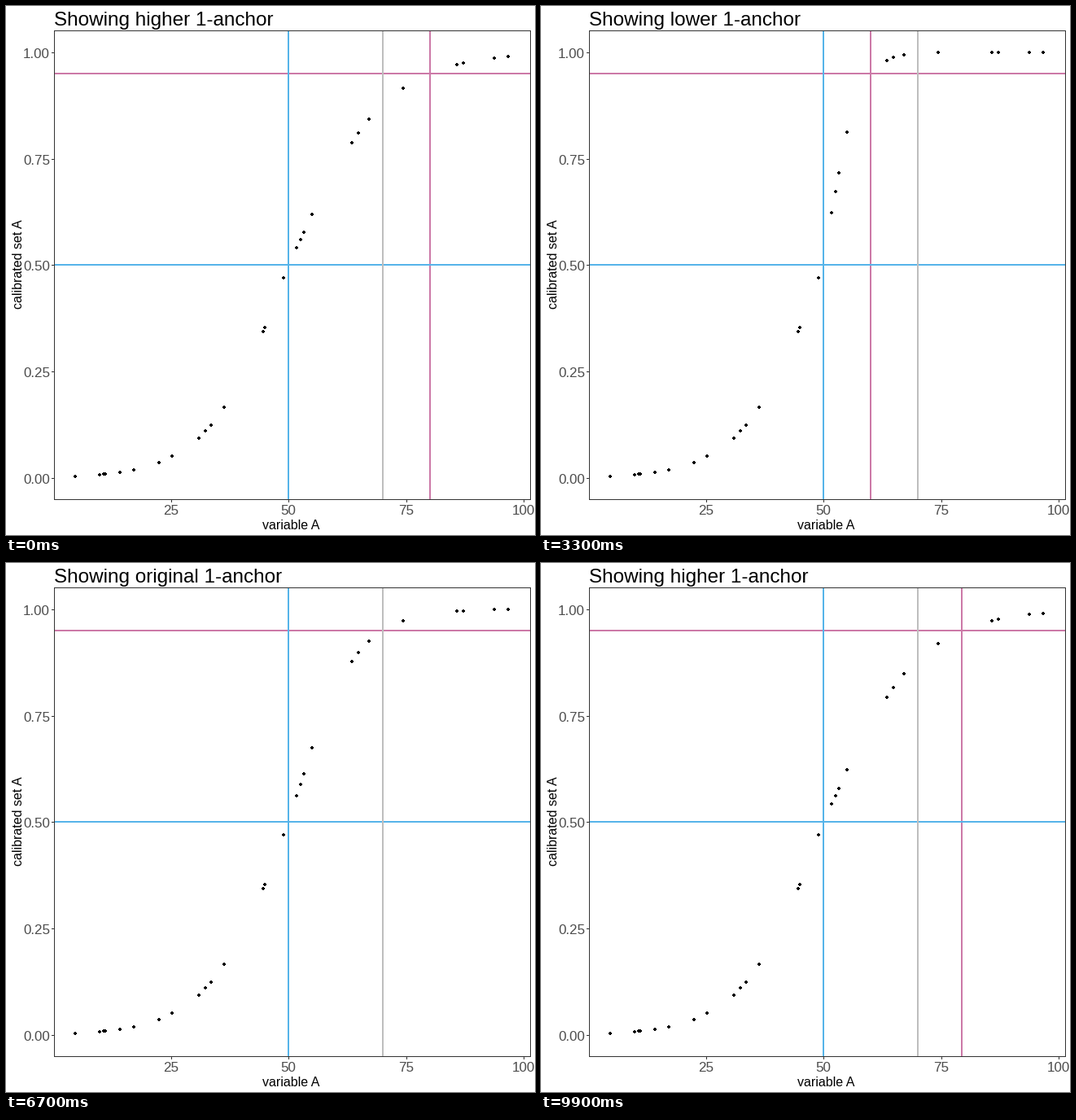
Write a matplotlib script that moves like this. It is 650 px wide and 650 px high and loops after 10 s.

```python
import math

import numpy as np
import matplotlib.pyplot as plt
from matplotlib.animation import FuncAnimation
from matplotlib.patches import Rectangle
from matplotlib.path import Path

SIZE, DPI, FRAMES = 650, 100, 100
PT = 72 / DPI                      # points per pixel
LEFT, TOP, RIGHT, BOTTOM = 59, 30, 644, 606
BLUE, PINK, GREY = "#56B4E9", "#CC79A7", "#BEBEBE"
BORDER, LABEL = "#333333", "#4D4D4D"

CROSSOVER, EXCLUSION = 50, 25
STATES = [("higher", 80), ("lower", 60), ("original", 70)]
HOLD, STEPS = 18, 15               # frames before the first move, frames per move


def pairs(gap, *centres):
    """Two cases on either side of each centre."""
    return [c + side * gap / 2 for c in centres for side in (-1, 1)]


VALUES = np.array(
    pairs(2.9, 15.6, 23.78, 34.87, 95.2)
    + pairs(1.45, 31.55, 52.43, 64.08, 86.47)
    + pairs(0.35, 10.8, 44.7)
    + [4.57, 9.77, 48.97, 52.45, 54.96, 67.08, 74.3])


def px(value):
    return np.floor(347.4 + 5.776 * (value - 50) + 0.5)


def py(score):
    return np.floor(580.25 - 523.65 * score + 0.5)


def calibrate(anchor):
    """Logistic membership with 0.05 / 0.5 / 0.95 at the three anchors."""
    spread = np.where(VALUES < CROSSOVER, CROSSOVER - EXCLUSION, anchor - CROSSOVER)
    return 1 / (1 + np.exp(-np.log(19) * (VALUES - CROSSOVER) / spread))


fig = plt.figure(figsize=(SIZE / DPI, SIZE / DPI), dpi=DPI, facecolor="white")
ax = fig.add_axes([0, 0, 1, 1])
ax.set_xlim(0, SIZE)
ax.set_ylim(SIZE, 0)
ax.axis("off")


def bar(x, y, w, h, color):
    """Solid pixel-aligned rectangle; later ones cover earlier ones."""
    return ax.add_patch(Rectangle((x, y), w, h, facecolor=color, linewidth=0))


def hline(score, color):
    bar(LEFT + 1, py(score) - 1, RIGHT - LEFT - 1, 2, color)


def vline(value, color):
    return bar(px(value) - 1, TOP + 1, 2, BOTTOM - TOP - 1, color)


def label(x, y, text, size, color="black", ha="center", **kw):
    return ax.text(x, y, text, fontsize=size * PT, color=color, ha=ha,
                   va="baseline", family="Liberation Sans", **kw)


# Reference lines, back to front
hline(0.95, PINK)
anchor_line = vline(STATES[0][1], PINK)
hline(0.5, BLUE)
vline(CROSSOVER, BLUE)
vline(STATES[-1][1], GREY)

# Panel border
for y in (TOP, BOTTOM):
    bar(LEFT, y, RIGHT - LEFT + 1, 1, BORDER)
for x in (LEFT, RIGHT):
    bar(x, TOP, 1, BOTTOM - TOP + 1, BORDER)

# Ticks and labels
for value in range(25, 101, 25):
    bar(px(value), BOTTOM + 1, 1, 3, BORDER)
    label(px(value), 625, str(value), 17, LABEL)
for score in np.linspace(0, 1, 5):
    bar(LEFT - 3, py(score), 3, 1, BORDER)
    label(54, py(score) + 7, f"{score:.2f}", 17, LABEL, ha="right")

label(350.5, 643, "variable A", 16)
label(20, 317, "calibrated set A", 16, rotation=90, rotation_mode="anchor")
title = label(59, 24, "", 24.3, ha="left")

# Dot four pixels across with notched corners: one corner turned four times
corners = [z * 1j ** k for k in range(4) for z in (1 - 2j, 1 - 1j, 2 - 1j)]
dot = Path([(z.real, z.imag) for z in corners + corners[:1]])
points, = ax.plot(px(VALUES), py(calibrate(STATES[0][1])), linestyle="none",
                  marker=dot, markersize=4 * PT, markeredgewidth=0, color="black")


def phase(frame):
    """Current state and how far it has moved on to the next one."""
    for state in range(len(STATES)):
        start = math.ceil(HOLD + state * FRAMES / len(STATES))
        if frame < start + STEPS:
            return state, max(0, (frame - start) / STEPS)


def draw(frame):
    state, t = phase(frame)
    (name, a), (next_name, b) = STATES[state], STATES[(state + 1) % len(STATES)]
    points.set_ydata(py((1 - t) * calibrate(a) + t * calibrate(b)))
    anchor_line.set_x(px((1 - t) * a + t * b) - 1)
    title.set_text(f"Showing {name if t < 0.5 else next_name} 1-anchor")
    return points, anchor_line, title


anim = FuncAnimation(fig, draw, frames=FRAMES, interval=100, repeat=True,
                     repeat_delay=0, blit=False)
plt.show()
```
